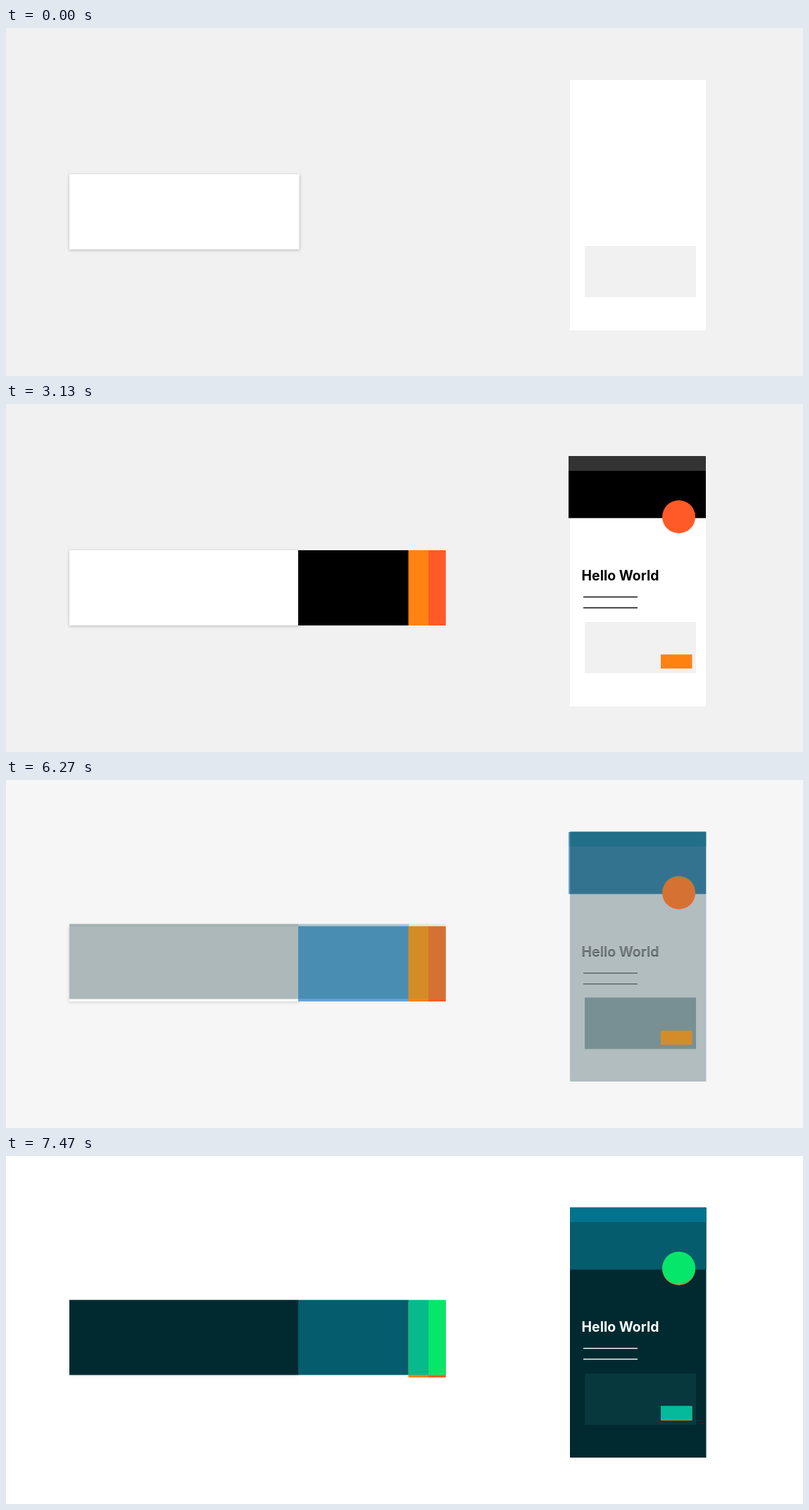
Write an HTML page with a canvas that moves like this. It is 1132 px wide and 495 px high and loops after 7.53 s.

```html
<!DOCTYPE html>
<html lang="en">
<head>
<meta charset="utf-8">
<title>Colour balance</title>
<style>
  html, body { margin: 0; width: 100%; height: 100%; overflow: hidden; background: #f1f1f1; }
  canvas { display: block; width: 1132px; height: 495px; }
</style>
</head>
<body>
<canvas id="stage"></canvas>
<script>
const W = 1132, H = 495, LOOP = 7530, STEP = 1000 / 15;
const canvas = document.getElementById('stage');
const ratio = window.devicePixelRatio || 1;
canvas.width = W * ratio;
canvas.height = H * ratio;
const ctx = canvas.getContext('2d');
ctx.scale(ratio, ratio);

// x, y, right, bottom
function box(color, x, y, r, b) {
  ctx.fillStyle = color;
  ctx.fillRect(x, y, r - x, b - y);
}

function shadowBox(color, shade, x, y, r, b) {
  ctx.save();
  ctx.shadowColor = shade;
  ctx.shadowBlur = 4 * ratio;
  ctx.shadowOffsetY = ratio;
  box(color, x, y, r, b);
  ctx.restore();
}

function disc(color, x, y, radius) {
  ctx.fillStyle = color;
  ctx.beginPath();
  ctx.arc(x, y, radius, 0, Math.PI * 2);
  ctx.fill();
}

function copy(color, dy) {
  ctx.fillStyle = color;
  ctx.font = '700 19.4px Inter, "Open Sans", sans-serif';
  ctx.textBaseline = 'alphabetic';
  ctx.fillText('Hello World', 817.6, 250.7 + dy);
  box(color, 820, 273.8 + dy, 897, 275.2 + dy);
  box(color, 820, 289.2 + dy, 897, 290.6 + dy);
}

function lightBase() {
  box('#f1f1f1', 0, 0, W, H);
  shadowBox('#fff', 'rgba(0,0,0,.25)', 90, 208, 416.5, 315);
  box('#fff', 801, 74, 994, 430);
  box('#f1f1f1', 822, 310, 980, 383);
}

function lightMain(bar, main) {
  box(main, 415, 208, 573, 315);
  box(main, 799, 74, 994, 162.3);
  box(bar, 799, 74, 994, 95);
  copy('#000', 0);
}

function lightAccents() {
  box('#ff8212', 571.5, 208, 600, 315);
  box('#ff5a28', 600, 208, 624.7, 315);
  box('#ff8212', 930, 356.3, 974.5, 376.3);
  disc('#ff5a28', 955.6, 160.4, 23.5);
}

function darkBase() {
  box('#fff', 0, 0, W, H);
  shadowBox('#002a30', 'rgba(0,0,0,.1)', 90, 204.7, 415, 311.5);
  box('#055c6c', 415, 204.7, 572, 311.5);
  box('#002a30', 801, 73.4, 994.5, 429);
  box('#055c6c', 801, 73.4, 994.5, 161.6);
  box('#04738e', 801, 73.4, 994.5, 94);
  box('#06383d', 822, 309.4, 980, 382.6);
  copy('#fff', -0.9);
}

function darkAccents() {
  box('#05bb8c', 571.5, 204.7, 600, 311.5);
  box('#06e66a', 600, 204.7, 624.7, 311.5);
  box('#05b99b', 930, 355.4, 974.5, 375.5);
  disc('#06e66a', 955.6, 159.4, 23.5);
}

function fade(t, from, to) {
  const k = Math.min(1, Math.max(0, (t - from) / (to - from)));
  return k < 0.5 ? 0.5 * (2 * k) ** 2.2 : 1 - 0.5 * (2 - 2 * k) ** 2.2;
}

function layer(alpha, paint) {
  if (alpha <= 0) return;
  ctx.globalAlpha = alpha;
  paint();
  ctx.globalAlpha = 1;
}

function mix(a, b, k) {
  return `rgb(${a.map((v, i) => Math.round(v + (b[i] - v) * k))})`;
}

function draw(time) {
  const t = Math.floor((time + 4) / STEP) * STEP;
  const blue = fade(t, 4600, 5067);
  const dark = fade(t, 6000, 6667);
  const bar = mix([51, 51, 51], [26, 107, 168], blue);
  const main = mix([0, 0, 0], [39, 122, 190], blue);

  lightBase();
  layer(fade(t, 600, 880), () => lightMain(bar, main));
  layer(dark, darkBase);
  layer(fade(t, 1933, 2400), lightAccents);
  // accents change hue a little later than the panels
  layer(dark ** 1.5, darkAccents);
}

function tick() {
  draw(performance.now() % LOOP);
  requestAnimationFrame(tick);
}
tick();
</script>
</body>
</html>
```
